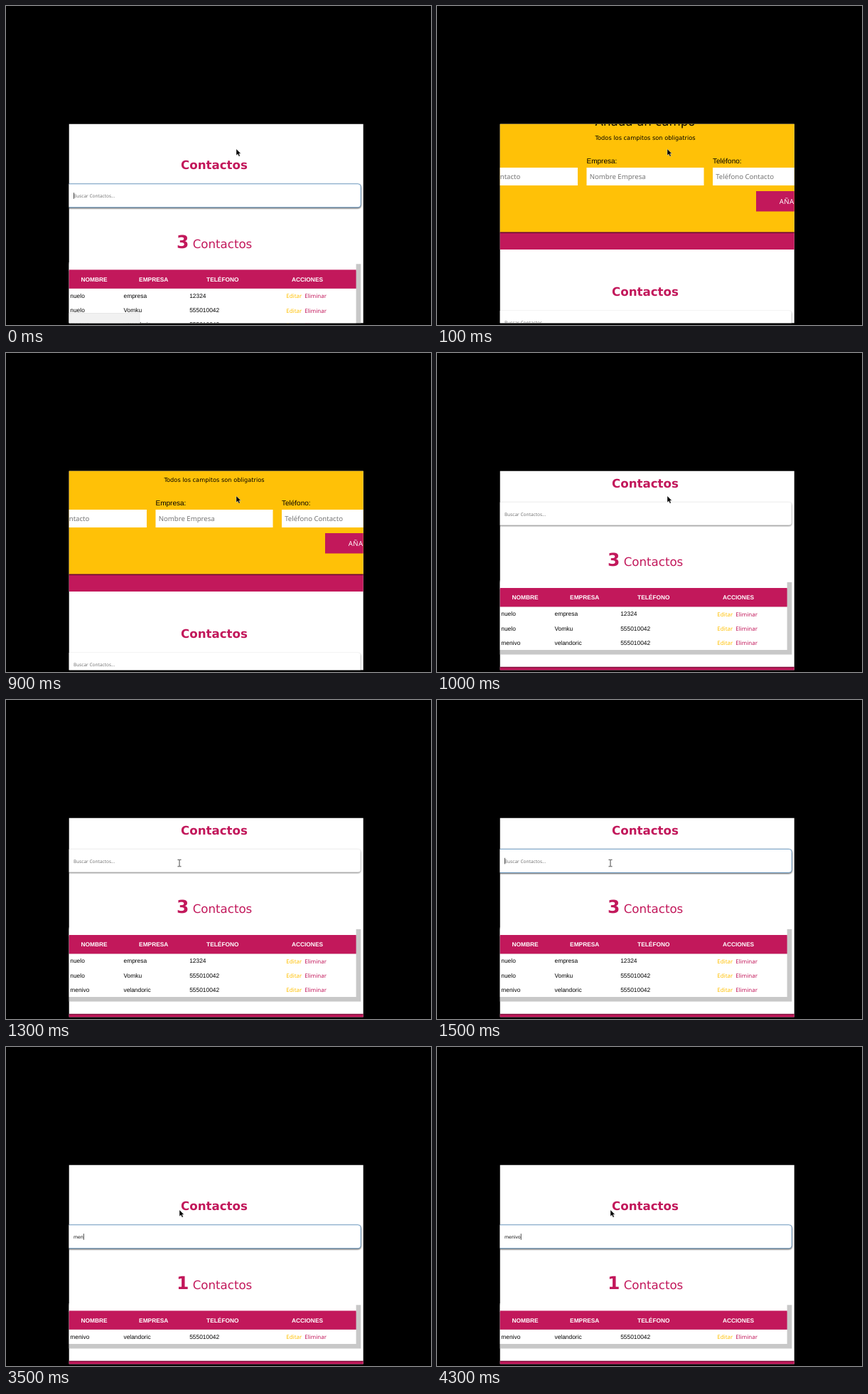
Recreate the animation shown at these times as an HTML page. Size 598x448 px, loop 5.3 s.

```html
<!DOCTYPE html>
<html lang="es">
<head>
<meta charset="utf-8">
<title>Contactos</title>
<style>
  html, body { margin: 0; width: 100%; height: 100%; overflow: hidden; background: #000; }
  svg { display: block; width: 598px; height: 448px; }
  text { white-space: pre; text-rendering: geometricPrecision; }
  .mid { text-anchor: middle; }
  .title { font: bold 16.65px "DejaVu Sans", sans-serif; fill: #c2185b; }
  .count { font: 16.65px "DejaVu Sans", sans-serif; fill: #c2185b; }
  .number { font: bold 25px "DejaVu Sans", sans-serif; }
  .formTitle { font: 16.65px "DejaVu Sans", sans-serif; }
  .note { font: 8.25px "DejaVu Sans", sans-serif; }
  .label { font: 10px "Liberation Sans", Arial, sans-serif; }
  .hint { font: 9.6px "Noto Sans", sans-serif; fill: #757575; }
  .button { font: 9.6px "Noto Sans", sans-serif; fill: #fff; letter-spacing: .5px; }
  .search { font: 6.5px "Noto Sans", sans-serif; }
  .head { font: bold 8.35px "Liberation Sans", Arial, sans-serif; fill: #fff; text-anchor: middle; }
  .cell { font: 8.4px "Liberation Sans", Arial, sans-serif; }
  .action { font: 7.95px "Noto Sans", sans-serif; }
  #box, #focus { filter: drop-shadow(0 1px 1.2px rgba(0, 0, 0, .55)); }
</style>
</head>
<body>
<svg viewBox="0 0 598 448">
  <defs>
    <clipPath id="view"><rect x="88.7" y="165.8" width="414" height="279.4"/></clipPath>
  </defs>
  <rect width="598" height="448"/>
  <g clip-path="url(#view)">
    <rect x="88" y="165" width="416" height="281" fill="#fff"/>
    <g id="page">
      <g id="form">
        <rect x="0" y="-200" width="598" height="340" fill="#ffc107"/>
        <rect x="0" y="139.5" width="598" height="24.5" fill="#c2185b"/>
        <rect x="0" y="139.5" width="598" height="1.6" fill="#000" opacity=".45"/>
        <rect x="449" y="82" width="104" height="28.5" fill="#c2185b"/>
      </g>
      <rect id="box" x="80" y="250" width="418.8" height="32.2" rx="3.5" fill="#fff"/>
      <rect id="focus" x="80" y="249.8" width="419.2" height="33" rx="4" fill="#fff" stroke="#6a9cc9" stroke-width=".9"/>
      <text id="query" class="search" x="95" y="269"></text>
      <rect id="caret" y="262.2" width=".8" height="8.6" fill="#222"/>
      <text class="count" x="240" y="339.5"><tspan id="total" class="number">3</tspan> Contactos</text>
      <g id="table">
        <rect id="frame" x="80" y="362.3" width="419.3" fill="#c8c8c8"/>
        <rect x="80" y="360" width="412.6" height="12" fill="#fff"/>
        <rect id="body" x="80" y="396.8" width="412.6" fill="#fff"/>
        <rect x="80" y="370.4" width="412.6" height="26.4" fill="#c2185b"/>
      </g>
      <g id="footer">
        <rect x="80" y="440.8" width="440" height="60" fill="#c2185b"/>
        <rect x="80" y="440.8" width="440" height="1.4" opacity=".35"/>
      </g>
    </g>
    <g id="status">
      <rect x="88" y="431.5" width="100" height="15" fill="#f1f1f1" stroke="#ddd" stroke-width=".6"/>
    </g>
  </g>
  <path id="arrow" d="M0 0V9L2.1 7.1L3.7 10.4L5.3 9.7L3.8 6.5H6.5Z" stroke="#fff" stroke-width=".4"/>
  <path id="beam" d="M-2.5 -4.5H-.6L0 -4L.6 -4.5H2.5M0 -4V4.5M-2.5 5H-.6L0 4.5L.6 5H2.5" fill="none" stroke="#333" stroke-width=".9"/>
</svg>
<script>
const LOOP = 5300;
const ROW = 20.2;
const $ = id => document.getElementById(id);

function add(parent, name, attrs, content = "") {
  const node = document.createElementNS("http://www.w3.org/2000/svg", name);
  for (const key in attrs) node.setAttribute(key, attrs[key]);
  node.textContent = content;
  return parent.appendChild(node);
}
const label = (parent, x, y, cls, content, fill) =>
  add(parent, "text", fill ? { x, y, class: cls, fill } : { x, y, class: cls }, content);
const show = (node, visible) => node.setAttribute("display", visible ? "inline" : "none");
const move = (node, x, y) => node.setAttribute("transform", `translate(${x} ${y})`);

// Form and headings
label($("form"), 293, -10, "formTitle mid", "Añada un campo");
label($("form"), 293, 10, "note mid", "Todos los campitos son obligatrios");
[["Nombre:", "Nombre Contacto"], ["Empresa:", "Nombre Empresa"], ["Teléfono:", "Teléfono Contacto"]]
  .forEach(([name, hint], i) => {
    const x = 33 + 177.5 * i;
    add($("form"), "rect", { x, y: 49, width: 165, height: 25, fill: "#fff" });
    label($("form"), x, 42.5, "label", name);
    label($("form"), x + 4.2, 65, "hint", hint);
  });
label($("form"), 481.7, 100, "button", "AÑADIR");
label($("page"), 293, 229.4, "title mid", "Contactos");

// Table
[["NOMBRE", 124], ["EMPRESA", 207.7], ["TELÉFONO", 304.8], ["ACCIONES", 424]]
  .forEach(([name, x]) => label($("table"), x, 386.8, "head", name));
const contacts = [
  ["nuelo", "empresa", "12324"],
  ["nuelo", "Vomku", "555010042"],
  ["menivo", "velandoric", "555010042"]
];
const rows = contacts.map(cells => {
  const row = add($("table"), "g", {});
  cells.forEach((value, i) => label(row, [90.3, 165.5, 258.2][i], 409.8, "cell", value));
  label(row, 394.3, 410.4, "action", "Editar", "#ffc107");
  label(row, 420.3, 410.4, "action", "Eliminar", "#c2185b");
  return row;
});

// Held values: [start time, value...]
const scroll = [[0, 0], [100, 178], [200, 214], [300, 222], [800, 214], [900, 171], [1000, -2 * ROW], [2700, 0]];
const pointer = [[0, 324, 200.8], [1100, 304, 208], [1200, 262, 223], [1300, 244, 228.8]];
const focus = [[0, 1], [100, 0], [1400, .5], [1500, 1]];
const typed = [[0, 0], [2700, 1], [2800, 2], [3500, 3], [4000, 4], [4200, 5], [4300, 6]];
const at = (track, t) => track.filter(([start]) => start <= t).pop().slice(1);

function draw(t) {
  const [offset] = at(scroll, t);
  const [px, py] = at(pointer, t);
  const [glow] = at(focus, t);
  const query = contacts[2][0].slice(0, at(typed, t)[0]);
  const matches = contacts.map(([name]) => name.startsWith(query));
  const total = matches.filter(Boolean).length;

  move($("page"), 0, offset);
  $("focus").setAttribute("opacity", glow);
  $("query").textContent = query || "Buscar Contactos...";
  $("query").setAttribute("fill", query ? "#111" : "#757575");
  $("caret").setAttribute("x", 95.1 + (query ? $("query").getComputedTextLength() : 0));
  show($("caret"), glow === 1);

  $("total").textContent = total;
  let line = 0;
  rows.forEach((row, i) => {
    show(row, matches[i]);
    if (matches[i]) move(row, 0, ROW * line++);
  });
  $("body").setAttribute("height", ROW * total);
  $("frame").setAttribute("height", 41 + ROW * total);
  move($("footer"), 0, ROW * (total - 1));

  show($("status"), t < 100);
  const beam = t >= 1200 && t < 2700;
  show($("arrow"), !beam);
  show($("beam"), beam);
  move($("arrow"), px, py);
  move($("beam"), px, py);
}

const begin = performance.now();
function tick() {
  draw((performance.now() - begin) % LOOP);
  requestAnimationFrame(tick);
}
tick();
</script>
</body>
</html>
```
